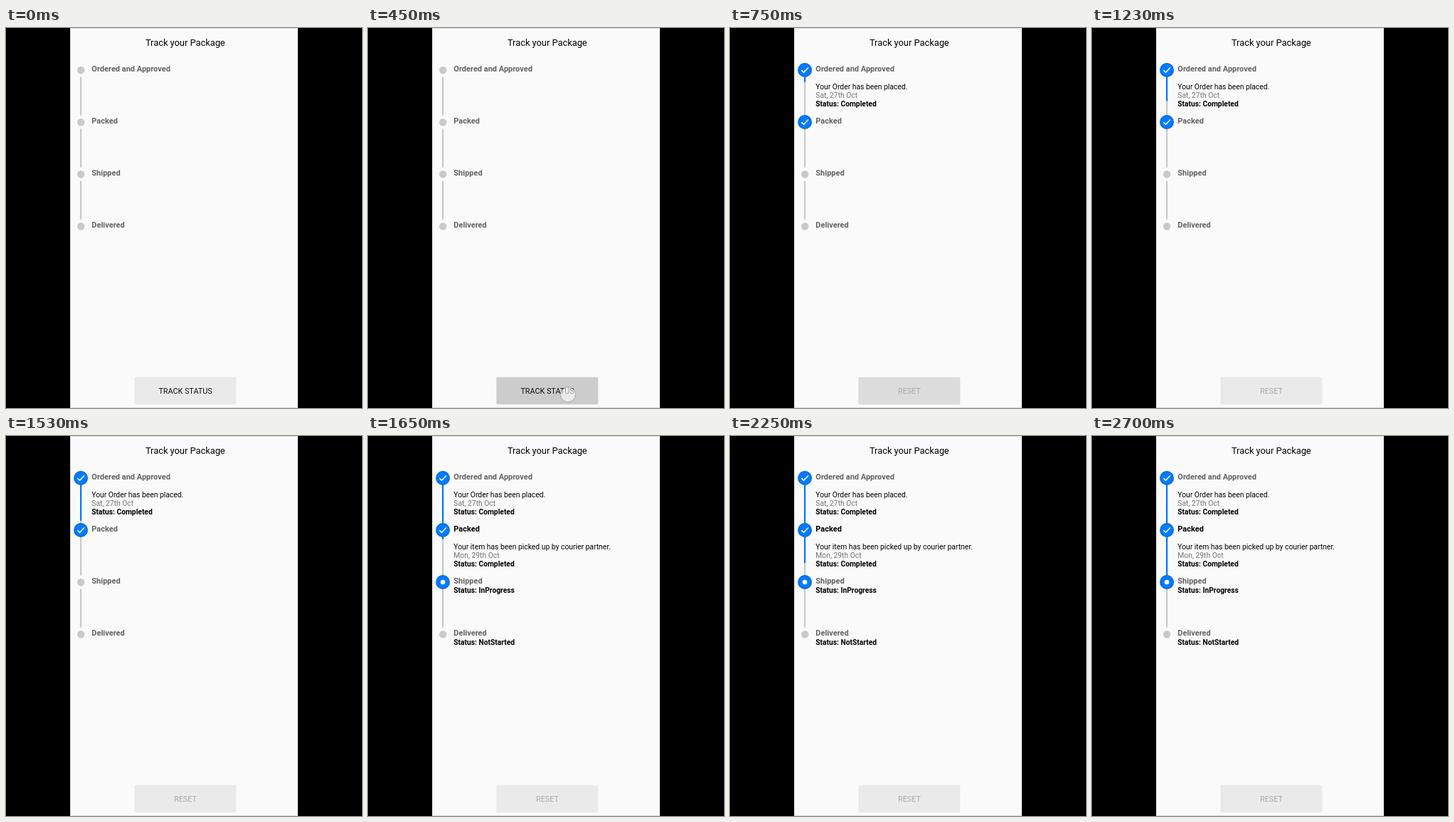
An HTML page with a canvas for the animation above (3.3 s loop, 500 by 533 pixels).

```html
<!DOCTYPE html>
<html lang="en">
<head>
<meta charset="utf-8">
<title>Track your Package</title>
<style>
html, body { margin: 0; width: 100%; height: 100%; overflow: hidden; background: #000; }
canvas { display: block; }
</style>
</head>
<body>
<canvas id="stage" width="500" height="533"></canvas>
<script>
const ctx = document.getElementById('stage').getContext('2d');

const LOOP = 3300, TICK = 30;
const PRESS = 360, RELEASE = 600, RELEASE_FADE = 620;
const FILL_TIME = 980, FIRST_FILL = 615, SECOND_FILL = 1588;
const STEP_X = 105, STEP_Y = 59, STEP_GAP = 73, TEXT_X = 120.3;
const BLUE = '#007bff', RIM = '#0062cc', GREY = '#c9c9c9', MUTED = '#636363';

const steps = [
  { title: 'Ordered and Approved', message: 'Your Order has been placed.',
    date: 'Sat, 27th Oct', status: 'Completed', textAt: RELEASE, markAt: RELEASE, mark: 'done' },
  { title: 'Packed', message: 'Your item has been picked up by courier partner.',
    date: 'Mon, 29th Oct', status: 'Completed', textAt: SECOND_FILL, markAt: RELEASE, mark: 'done',
    boldAt: SECOND_FILL },
  { title: 'Shipped', status: 'InProgress', textAt: SECOND_FILL, markAt: SECOND_FILL, mark: 'active' },
  { title: 'Delivered', status: 'NotStarted', textAt: SECOND_FILL, markAt: Infinity }
];
const fillStarts = [FIRST_FILL, SECOND_FILL, Infinity];

const clamp = v => Math.max(0, Math.min(1, v));

function rect(x, y, w, h, color) {
  ctx.fillStyle = color;
  ctx.fillRect(x, y, w, h);
}

function disc(x, y, r, color) {
  ctx.fillStyle = color;
  ctx.beginPath();
  ctx.arc(x, y, r, 0, Math.PI * 2);
  ctx.fill();
}

function text(str, x, y, size, color, weight = 400, align = 'left') {
  ctx.font = `${weight} ${size}px Roboto, sans-serif`;
  ctx.textAlign = align;
  ctx.fillStyle = color;
  ctx.fillText(str, x, y);
}

function drawConnector(y, progress) {
  rect(STEP_X - 1, y + 9.5, 2.2, 54, GREY);
  rect(STEP_X - 1, y + 9.5, 2.2, 54 * progress, BLUE);
}

function drawMarker(y, mark) {
  if (!mark) return disc(STEP_X + 0.2, y + 0.2, 5.2, GREY);
  disc(STEP_X + 0.1, y, 9.9, RIM);
  disc(STEP_X + 0.1, y, 8.8, BLUE);
  if (mark === 'active') return disc(STEP_X + 0.1, y, 3.3, '#fff');
  ctx.strokeStyle = '#fff';
  ctx.lineWidth = 1.6;
  ctx.beginPath();
  ctx.moveTo(STEP_X - 4.6, y + 0.2);
  ctx.lineTo(STEP_X - 1.5, y + 3.3);
  ctx.lineTo(STEP_X + 5, y - 3.5);
  ctx.stroke();
}

function drawStep(step, i, t) {
  const y = STEP_Y + i * STEP_GAP;
  drawMarker(y, t >= step.markAt && step.mark);
  text(step.title, TEXT_X, y + 2, 11, t >= step.boldAt ? '#000' : MUTED, 700);
  if (t < step.textAt) return;
  if (step.message) {
    text(step.message, TEXT_X, y + 27, 10.33, '#000');
    text(step.date, TEXT_X, y + 39, 10.33, '#737373');
  }
  text('Status: ' + step.status, TEXT_X, y + (step.message ? 51 : 15), 10.25, '#000', 700);
}

function drawButton(t) {
  const pressed = t < RELEASE_FADE
    ? clamp((t - PRESS + TICK) / 120)
    : 1 - clamp((t - RELEASE_FADE) / 250);
  const shade = Math.round(234 - 30 * pressed);
  ctx.fillStyle = `rgb(${shade},${shade},${shade})`;
  ctx.beginPath();
  ctx.roundRect(180.3, 489.7, 143, 38.3, 2);
  ctx.fill();

  const idle = t < RELEASE;
  text(idle ? 'TRACK STATUS' : 'RESET', 252, 513, 10.8, idle ? '#111' : '#aaa', 400, 'center');
  if (t >= PRESS && idle) drawTouch(281, 514.3);
}

function drawTouch(x, y) {
  disc(x, y, 10.5, 'rgba(255,255,255,0.6)');
  ctx.strokeStyle = 'rgba(120,120,140,0.55)';
  ctx.lineWidth = 1;
  ctx.stroke();
}

function draw(t) {
  rect(0, 0, 500, 533, '#000');
  rect(90, 0, 320, 533, '#dadada');
  rect(91, 1, 318, 531, '#fafafa');
  text('Track your Package', 251.8, 25, 12.83, '#000', 400, 'center');
  fillStarts.forEach((start, i) =>
    drawConnector(STEP_Y + i * STEP_GAP, clamp((t - start) / FILL_TIME)));
  steps.forEach((step, i) => drawStep(step, i, t));
  drawButton(t);
}

const began = performance.now();
function frame() {
  const t = (performance.now() - began) % LOOP;
  draw(Math.floor(t / TICK) * TICK);
  requestAnimationFrame(frame);
}
frame();
</script>
</body>
</html>
```
